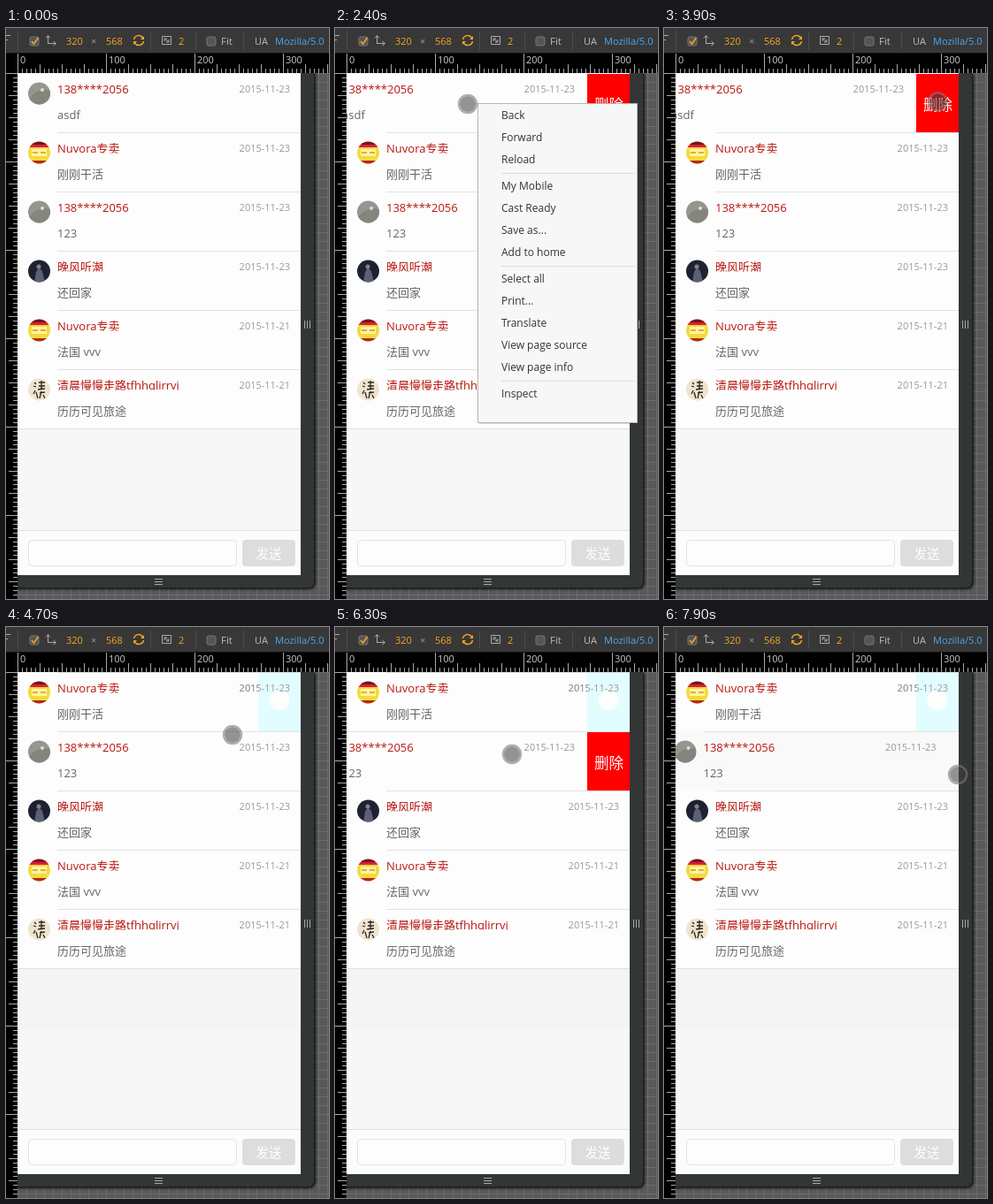
These frames come from a looping animation (365 by 646 pixels, 8 s). An HTML page:

```html
<!DOCTYPE html>
<html lang="zh">
<head>
<meta charset="utf-8">
<style>
html, body { margin: 0; width: 100%; height: 100%; overflow: hidden; background: #000; }
svg { display: block; font-family: "Open Sans", "Noto Sans CJK SC", "Noto Sans CJK", sans-serif; }
text { white-space: pre; }
</style>
</head>
<body>
<svg id="stage" width="365" height="646" viewBox="0 0 365 646">
  <defs>
    <clipPath id="page"><rect x="13" y="51" width="320" height="568"/></clipPath>
    <clipPath id="face"><circle cx="37.5" cy="23" r="12.5"/></clipPath>
    <clipPath id="line"><rect x="50" y="0" width="200" height="23.5"/></clipPath>
    <pattern id="grid" x="13" y="51" width="10" height="10" patternUnits="userSpaceOnUse">
      <rect width="10" height="10" fill="#595959"/>
      <path d="M0 .5H10M.5 0V10" stroke="#6c6c6c"/>
    </pattern>
    <filter id="soft" x="-10%" y="-10%" width="120%" height="120%"><feGaussianBlur stdDeviation="1.5"/></filter>
  </defs>
</svg>
<script>
const NS = 'http://www.w3.org/2000/svg';
const stage = document.getElementById('stage');

function add(parent, tag, attrs = {}, content) {
  const node = document.createElementNS(NS, tag);
  for (const key in attrs) node.setAttribute(key, attrs[key]);
  if (content !== undefined) node.textContent = content;
  parent.appendChild(node);
  return node;
}
const box = (p, x, y, width, height, fill, more) => add(p, 'rect', { x, y, width, height, fill, ...more });
const path = (p, d, stroke, more) => add(p, 'path', { d, stroke, fill: 'none', ...more });
const dot = (p, cx, cy, r, fill, more) => add(p, 'circle', { cx, cy, r, fill, ...more });
const label = (p, x, y, size, fill, content, more) =>
  add(p, 'text', { x, y, fill, 'font-size': size, ...more }, content);
const show = (node, on) => node.setAttribute('visibility', on ? 'visible' : 'hidden');
const move = (node, x, y) => node.setAttribute('transform', `translate(${x} ${y})`);

function drawShell() {
  box(stage, 0, 0, 365, 646, 'url(#grid)');
  box(stage, 5, 48, 345, 587, '#000', { rx: 7, opacity: .8, filter: 'url(#soft)' });
  box(stage, 5, 40, 343, 593, '#333637', { rx: 6 });
  path(stage, 'M337.5 331v9M340.5 331v9M343.5 331v9M168 623.5h9M168 626.5h9M168 629.5h9', '#aaa');
  box(stage, 0, 28, 365, 23, '#000');
  box(stage, 0, 28, 13, 618, '#000');

  let ticks = '';
  for (let n = 0; n <= 600; n += 5) {
    const length = n % 100 === 0 ? 23 : n % 25 === 0 ? 10 : 5;
    if (n < 355) ticks += `M${13.5 + n} 51v${-length}`;
    ticks += `M13 ${51.5 + n}h${-Math.min(length, 13)}`;
  }
  path(stage, ticks, '#aaa');
  for (let n = 0; n < 400; n += 100) label(stage, 16 + n, 40, 11, '#ccc', n);
}

function drawToolbar() {
  box(stage, 0, 0, 365, 28, '#383838');
  box(stage, 0, 28, 365, 1, '#111');
  path(stage, 'M13.5 2v24M163.5 4v21M214.5 4v21M268.5 4v21', '#4c4c4c');
  path(stage, 'M0 8.5h5M0 13.5h2', '#aaa');
  for (const x of [27, 227]) box(stage, x, 10, 10, 10, '#555', { rx: 2, stroke: '#777' });
  path(stage, 'M29 15l2.5 3 5-7', '#f5a623', { 'stroke-width': 1.6 });
  path(stage, 'M47.5 17V9M45 11.5l2.5-3 2.5 3M47 17.5h9M53.5 15l3 2.5-3 2.5', '#aaa');
  path(stage, 'M144.5 13a5.5 5.5 0 0 1 10-2M155.5 15a5.5 5.5 0 0 1-10 2', '#f5a623', { 'stroke-width': 1.5 });
  path(stage, 'M156 9v4h-4zM144 19v-4h4z', 'none', { fill: '#f5a623' });
  path(stage, 'M176.5 9.5h10v9h-10zM179 15v-3h3M184 13v3h-3M179 12l5 4', '#aaa');
  label(stage, 68, 19, 11, '#f5a623', '320');
  label(stage, 96, 19, 11, '#999', '×');
  label(stage, 113, 19, 11, '#f5a623', '568');
  label(stage, 195, 19, 11, '#f5a623', '2');
  label(stage, 243, 19, 11.5, '#bbb', 'Fit');
  label(stage, 281, 19, 11, '#bbb', 'UA');
  label(stage, 304, 19, 11, '#4ba7ef', 'Mozilla/5.0');
}

const avatars = {
  stone(g) {
    box(g, 25, 10, 25, 26, '#96968f');
    path(g, 'M25 30Q36 16 50 20V36H25z', 'none', { fill: '#85857e' });
    dot(g, 41, 19, 2, '#deded8');
  },
  shop(g) {
    box(g, 25, 10, 25, 26, '#f2dc3a');
    box(g, 25, 10, 25, 4, '#7d1020');
    box(g, 25, 14, 25, 3, '#d6203a');
    box(g, 29, 19, 17, 8, '#fff3a0');
    path(g, 'M30 23h6M39 23h6', '#e09030', { 'stroke-width': 1.5 });
    box(g, 25, 32, 25, 4, '#b5281c');
  },
  night(g) {
    box(g, 25, 10, 25, 26, '#1d2233');
    path(g, 'M32 36l2-12 3-5 4 4 3 13z', 'none', { fill: '#5d6073' });
    dot(g, 37, 18, 2.5, '#8c7d80');
  },
  ink(g) {
    box(g, 25, 10, 25, 26, '#f0e4cf');
    path(g, 'M32 15l2 2M31 19l3 1M33 24l-2 4M37 15h7M40 13v10M37 19h7M36 23l8-1M34 26l2 7M38 27l6-1M40 25l-2 8M42 29l2 4',
      '#2b2622', { 'stroke-width': 1.3 });
  }
};

const entries = [
  ['stone', '138****2056', 'asdf', '23'],
  ['shop', 'Nuvora专卖', '刚刚干活', '23'],
  ['stone', '138****2056', '123', '23'],
  ['night', '晚风听潮', '还回家', '23'],
  ['shop', 'Nuvora专卖', '法国 vvv', '21'],
  ['ink', '清晨慢慢走路tfhhqlirrvj', '历历可见旅途', '21']
];

drawShell();
drawToolbar();

const page = add(stage, 'g', { 'clip-path': 'url(#page)' });
box(page, 13, 51, 320, 568, '#f6f7f6');
const gap = box(page, 13, 386, 320, 69, '#f4f4f4');
const list = add(page, 'g');

const rows = entries.map(([avatar, name, message, day], i) => {
  const g = add(list, 'g');
  const back = box(g, 13, 0, 370, 67, '#fdfdfd');
  if (i) box(g, 58, 0, 325, 1, '#e2e2e2');
  avatars[avatar](add(g, 'g', { 'clip-path': 'url(#face)' }));
  label(add(g, 'g', { 'clip-path': 'url(#line)' }), 58, 23, 13, '#b9160f', name);
  label(g, 321, 22, 11, '#999', '2015-11-' + day, { 'text-anchor': 'end' });
  label(g, 58, 52, 13, '#666', message);
  const remove = add(g, 'g');
  box(remove, 335, 1, 48, 66, '#f00');
  label(remove, 359.5, 42, 16.5, '#fff', '删除', { 'text-anchor': 'middle', 'font-weight': 500 });
  return { g, back, remove };
});
const listEnd = box(list, 13, 0, 320, 1, '#e0e0e0');

const tint = add(page, 'g');
box(tint, 285, 52, 48, 66, '#e2fdff');
dot(tint, 309, 83, 11.5, '#fdfdfd');
label(tint, 321, 73, 11, '#999', '2015-11-23', { 'text-anchor': 'end' });

box(page, 13, 568, 320, 51, '#fcfcfc');
box(page, 13, 568, 320, 1, '#e0e0e0');
box(page, 25.5, 579.5, 235, 29, '#fdfdfd', { rx: 4, stroke: '#e2e2e2' });
box(page, 267, 579, 60, 30, '#ddd', { rx: 4 });
label(page, 297, 599.5, 14.5, '#fff', '发送', { 'text-anchor': 'middle' });

const menu = add(stage, 'g');
box(menu, 163, 87, 180, 361, '#000', { opacity: .15 });
box(menu, 161.5, 85.5, 180, 361, '#f7f7f7', { stroke: '#b5b5b5' });
['Back', 'Forward', 'Reload', '', 'My Mobile', 'Cast Ready', 'Save as...', 'Add to home', '',
  'Select all', 'Print...', 'Translate', 'View page source', 'View page info', '', 'Inspect'].reduce((y, item) => {
  if (item) label(menu, 188, y, 12, '#333', item);
  else box(menu, 188, y - 14, 150, 1, '#ddd');
  return y + (item ? 25 : 5);
}, 103);

const cursor = add(stage, 'g');
dot(cursor, 0, 0, 9, 'rgba(60,60,60,.55)');
dot(cursor, 0, 0, 10.1, 'none', { stroke: 'rgba(125,125,125,.62)', 'stroke-width': 2.2 });

// [start time, step values...]; one step every 100 ms, then hold
const STEP = 100, LOOP = 8000, DELETE_AT = 4200, CLOSE_AT = 7700;
const cursorRuns = [
  [300, [182, 109], [169, 109], [154, 107], [140, 104], [150, 95], [162, 87]],
  [2400, [150, 86], [139, 85]],
  [3000, [165, 89], [205, 94], [248, 92], [285, 85], [298, 91], [304, 101], [308, 97], [309, 91], [309, 85], [309.5, 83.5]],
  [4700, [256, 122], [270, 147], [250, 152], [228, 151], [210, 150]],
  [5500, [187, 146], [151, 144], [115, 142]],
  [6200, [150, 143], [200, 144], [250, 144], [290, 144], [309, 144]],
  [7300, [306, 146], [212, 150], [143, 151]],
  [7700, [160, 152], [245, 159], [332, 167]]
];
const firstSwipe = [[1600, -2, -14, -33, -46, -50]];
const secondSwipe = [[5600, -12, -36.5, -46, -49, -50], [CLOSE_AT, -47, -32, -13.5]];

function sample(runs, t, initial) {
  const run = runs.filter(r => r[0] <= t).pop();
  if (!run) return initial;
  return run[Math.min(run.length - 1, 1 + Math.floor((t - run[0]) / STEP))];
}

function render(t) {
  const deleted = t >= DELETE_AT;
  const shift = { 0: sample(firstSwipe, t, 0), 2: sample(secondSwipe, t, 0) };
  rows.forEach(({ g, remove }, i) => {
    g.setAttribute('display', i || !deleted ? 'inline' : 'none');
    move(g, shift[i] || 0, 51 + 67 * (i - deleted));
    show(remove, t < CLOSE_AT);
  });
  const dragging = (t >= 5500 && t < 6000) || t >= CLOSE_AT;
  rows[2].back.setAttribute('fill', dragging ? '#f9f9f9' : '#fdfdfd');
  move(listEnd, 0, deleted ? 386 : 453);
  show(gap, deleted);
  show(tint, deleted);
  show(menu, t >= 2100 && t < 2700);
  const at = sample(cursorRuns, t, null);
  show(cursor, at);
  if (at) move(cursor, ...at);
}

const start = performance.now();
function tick() {
  render((performance.now() - start) % LOOP);
  requestAnimationFrame(tick);
}
render(0);
requestAnimationFrame(tick);
</script>
</body>
</html>
```
